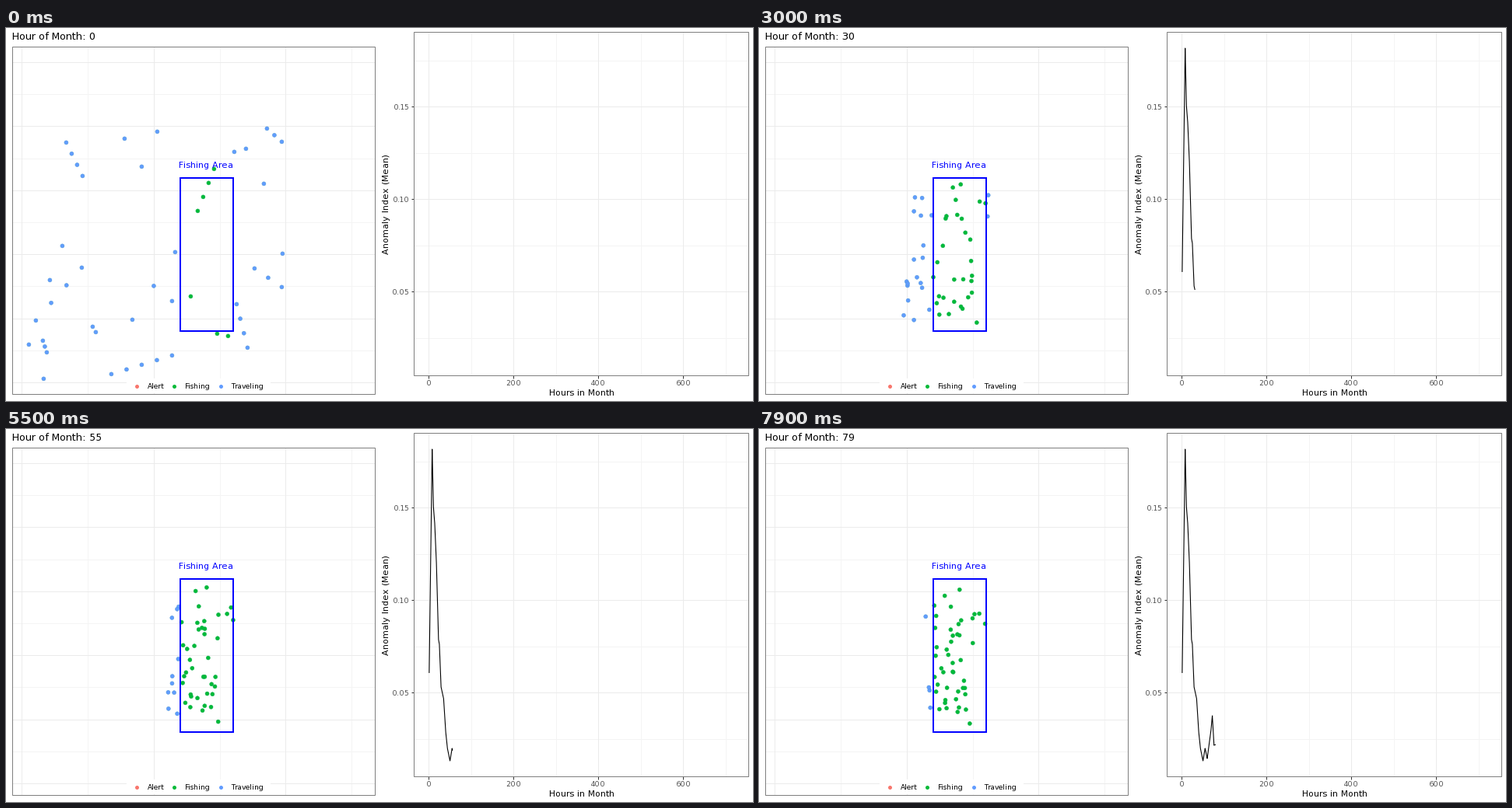
A matplotlib script that plays this animation: 960 px wide and 480 px high, repeating every 8 s.

```python
import numpy as np
import matplotlib.pyplot as plt
from matplotlib.animation import FuncAnimation
from matplotlib.patches import Rectangle

W, H, DPI = 960, 480, 100
HOURS, STEP_MS = 80, 100
PT = 72 / DPI
RED, GREEN, BLUE = "#F8766D", "#00BA38", "#619CFF"
AREA = (224, 193, 292, 390)

plt.rcParams["font.family"] = "DejaVu Sans"
plt.rcParams["text.hinting_factor"] = 1
fig = plt.figure(figsize=(W / DPI, H / DPI), dpi=DPI, facecolor="white")
ax = fig.add_axes([0, 0, 1, 1])
ax.set(xlim=(0, W), ylim=(H, 0))
ax.axis("off")


def text(x, y, s, size, color="black", ha="left", va="baseline", **kw):
    return ax.text(x, y, s, fontsize=size * PT, color=color, ha=ha, va=va, **kw)


def line(xs, ys, color, width=1, z=1):
    return ax.plot(xs, ys, color=color, lw=width * PT, zorder=z,
                   solid_capstyle="butt")[0]


def box(x0, y0, x1, y1, edge="none", face="none", width=1, z=6):
    ax.add_patch(Rectangle((x0, y0), x1 - x0, y1 - y0, ec=edge, fc=face,
                           lw=width * PT, zorder=z))


def panel(x0, y0, x1, y1, major_x, major_y, minor_x, minor_y):
    for xs, ys, color, z in ((minor_x, minor_y, "#F4F4F4", 1),
                             (major_x, major_y, "#EBEBEB", 2)):
        for x in xs:
            line([x, x], [y0, y1], color, z=z)
        for y in ys:
            line([x0, x1], [y, y], color, z=z)
    box(x0, y0, x1, y1, edge="#7F7F7F")


# Map panel
panel(8, 24, 474, 471,
      20 + 169.7 * np.arange(3), 44 + 82.4 * np.arange(6),
      105 + 169.7 * np.arange(3), 85.2 + 82.4 * np.arange(5))
box(155, 451, 340, 470, face="white", z=3)
for dot_x, label_x, label, color in ((168.2, 181.5, "Alert", RED),
                                     (216.3, 229.5, "Fishing", GREEN),
                                     (276, 289.7, "Traveling", BLUE)):
    ax.plot(dot_x, 461, "o", ms=5 * PT, mew=0, color=color, zorder=4)
    text(label_x, 464.2, label, 8.8)
box(*AREA, edge="#0000FF", width=2, z=7)
text(257.5, 180, "Fishing Area", 11.2, "#0000FF", "center", zorder=8)
title = text(8, 15, "", 13)

# Chart panel
ticks_x = 543 + 109.1 * np.arange(4)
ticks_y = 101 + 119 * np.arange(3)
panel(524, 5, 954, 447, ticks_x, ticks_y,
      ticks_x + 54.5, 42 + 119 * np.arange(4))
for i, x in enumerate(ticks_x):
    line([x, x], [447, 451], "#333333")
    text(x + 0.3, 460.3, str(200 * i), 8.8, "#4D4D4D", "center")
for i, y in enumerate(ticks_y):
    line([521, 524], [y, y], "#333333")
    text(519.3, y + 3.7, f"{0.15 - 0.05 * i:.2f}", 8.8, "#4D4D4D", "right")
text(739.5, 473.3, "Hours in Month", 11, ha="center")
text(494, 226.5, "Anomaly Index (Mean)", 11, ha="right", va="center",
     rotation=90)

# Turning points of the anomaly curve: hour, height on stage
TURNS = [(1, 314), (8, 26), (11, 100), (14, 121), (18, 172), (23, 271),
         (25, 277), (29, 332), (35, 347), (40, 390), (44, 411), (50, 427),
         (55, 411), (60, 424), (69, 387), (72, 369), (76, 407), (80, 406)]
hours = np.arange(1, HOURS + 1)
curve_x = 543.3 + 0.5455 * hours
curve_y = np.interp(hours, *zip(*TURNS))
curve = line([], [], "black", 1.1, z=5)

# Vessels start in loose rows: first place, last place, count
ROWS = [((77, 147), (98, 190), 4), ((152, 142), (194, 133), 2),
        ((174, 178), (174, 178), 1), ((72, 280), (56, 324), 2),
        ((97, 308), (38, 376), 4), ((29, 407), (48, 451), 2),
        ((47, 402), (52, 417), 3), ((111, 384), (115, 391), 2),
        ((162, 375), (217, 288), 3), ((135, 445), (213, 421), 5),
        ((213, 351), (237, 345), 2), ((335, 129), (354, 146), 3),
        ((308, 155), (293, 159), 2), ((331, 200), (355, 290), 2),
        ((319, 309), (354, 333), 3), ((296, 355), (310, 411), 4),
        ((267, 181), (246, 235), 4), ((271, 393), (285, 396), 2)]
start = np.vstack([np.linspace(a, b, n) for a, b, n in ROWS])

# Each heads for the middle of the area, keeping some of its bearing
rng = np.random.default_rng(4)
middle = np.array([258, 290])
goal = middle + (0.12, 0.38) * (start - middle)
goal += rng.normal(0, (12, 24), start.shape)
goal = np.clip(goal, (221, 200), (286, 387))
phase = rng.uniform(0, 2 * np.pi, start.shape)


def vessels(h):
    progress = 1 - np.exp(-(h / 16) ** 0.8)
    drift = 4 * progress ** 2 * np.sin(0.2 * h + phase)
    return start + (goal - start) * progress + drift


def fishing(pos, h):
    x, y = pos.T
    x0, y0, x1, y1 = AREA
    pad = max(1.5, 13 - 4 * h)
    return (x > x0 - 2) & (x < x1 + 1) & (y > y0 - pad) & (y < y1 + pad)


dots = ax.scatter(*start.T, s=(5 * PT) ** 2, lw=0.5 * PT, zorder=4)


def draw(h):
    pos = vessels(h)
    inside = fishing(pos, h)
    dots.set_offsets(pos + 0.4)
    dots.set_facecolor(np.where(inside, GREEN, BLUE))
    dots.set_edgecolor(np.where(inside, "#0CB04A", "#4E98D6"))
    title.set_text(f"Hour of Month: {h}")
    shown = h + 1 if h else 0
    curve.set_data(curve_x[:shown], curve_y[:shown])
    return dots, title, curve


anim = FuncAnimation(fig, draw, frames=HOURS, interval=STEP_MS,
                     init_func=lambda: draw(0), repeat=True, repeat_delay=0)
plt.show()
```
